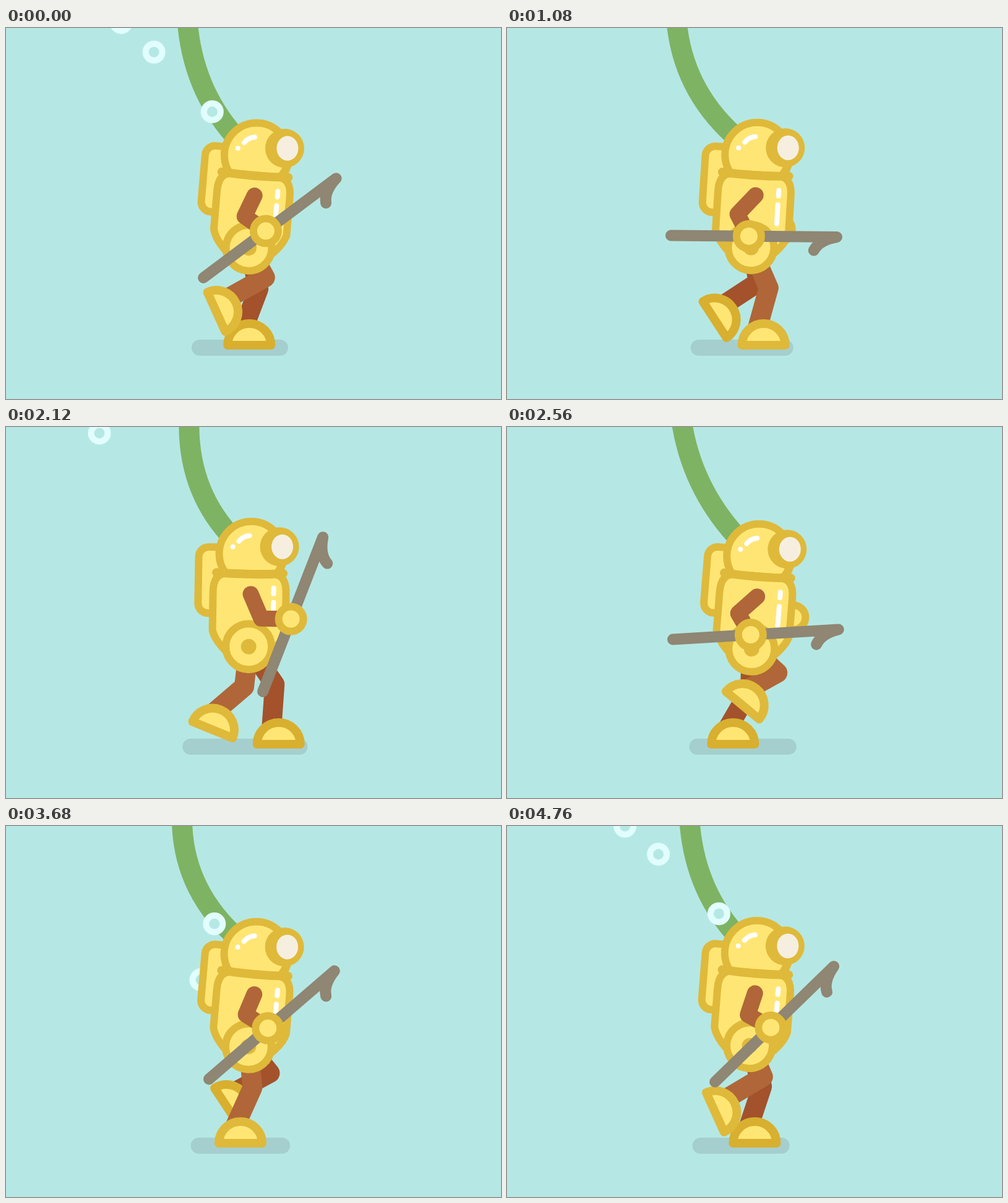
These frames come from a looping animation (800x600 px, 4.8 s). An HTML page with a canvas:

```html
<!DOCTYPE html>
<html lang="en">
<head>
<meta charset="utf-8">
<title>Walking diver</title>
<style>
html, body { margin: 0; width: 100%; height: 100%; overflow: hidden; background: #b5e8e4; }
canvas { display: block; }
</style>
</head>
<body>
<canvas id="stage" width="800" height="600"></canvas>
<script>
const ctx = document.getElementById('stage').getContext('2d');
const LOOP = 4800, STRIDE = 2400;
const LIFT_OFF = 1770, SWING = 1220, REAR = 326, REACH = 142, GROUND = 513;
const WATER = '#b5e8e4', GOLD = '#dfb93a', FAR_GOLD = '#d8af2f', YELLOW = '#ffe674';
const SKIN = '#b06638', FAR_SKIN = '#a3522c', STEEL = '#8f8673', WHITE = '#ffffff';

// birth time, start x, y, speed x, y in px per second
const BUBBLES = [
  [1400, 355, 175, -283, -229],
  [3600, 355, 175, -225, -207],
  [3680, 315, 249, -115, -230],
  [3850, 355, 175, -274, -223],
  [3960, 356, 177, -139, -164],
  [4680, 361, 155, -229, -162]
];

const { sin, cos, PI } = Math;
const radians = degrees => degrees * PI / 180;
const angleAt = time => time / STRIDE * 2 * PI;

function smoothstep(from, to, value) {
  const u = Math.max(0, Math.min(1, (value - from) / (to - from)));
  return u * u * (3 - 2 * u);
}

function turn(x, y, degrees) {
  const c = cos(radians(degrees)), s = sin(radians(degrees));
  return [x * c - y * s, x * s + y * c];
}

// The foot slides back along the ground, then lifts, tips and swings forward.
function footPose(time) {
  const age = (time - LIFT_OFF + 2 * STRIDE) % STRIDE;
  if (age > SWING) {
    return { x: REAR + REACH * (1 - smoothstep(SWING, STRIDE, age)), y: GROUND, tilt: 0 };
  }
  const v = age / SWING, arch = sin(PI * v);
  return {
    x: REAR + REACH * smoothstep(.47, .94, v) + 10 * arch,
    y: GROUND - 63 * sin(PI * v ** 1.7),
    tilt: 66 * Math.max(0, arch) ** 4.5
  };
}

function kneeOffset(time) {
  const p = angleAt(time);
  return [
    17 + 43 * sin(p + .12) + 4 * cos(2 * p),
    57 - 16 * cos(p - .96) - 6 * sin(2 * p)
  ];
}

function bodyPose(p) {
  return {
    x: 395.5 + 4.5 * sin(p) - 3 * cos(2 * p),
    y: 358.5 + sin(p) + 3.7 * cos(2 * p - 2.44),
    tilt: 1.7 + 3.3 * cos(2 * p - .35),
    hoseTop: 279 + 18 * cos(p + 1.22) + 9 * cos(2 * p),
    hoseBend: 290 + 8 * cos(p) + 8 * cos(2 * p)
  };
}

// One arm swing drives hand, elbow and spear.
function armPose(p) {
  const s = sin(p - .08), bulge = s * s;
  return {
    hand: [415 - 63 * s, 330 + 20.8 * s - 8.4 * bulge],
    elbow: [383 - 32 * s + 12 * bulge, 304 - 8 * s],
    spear: -31 + 62 * sin(1.25 * s) + 21 * bulge,
    farHand: [425 + 75 * sin(p + .1), 324 - 22 * sin(p + .4)]
  };
}

function shape(path, stroke, width, fill) {
  const p = typeof path === 'string' ? new Path2D(path) : path;
  if (fill) { ctx.fillStyle = fill; ctx.fill(p); }
  if (stroke) { ctx.strokeStyle = stroke; ctx.lineWidth = width; ctx.stroke(p); }
}

function ellipse(x, y, rx, ry, stroke, width, fill) {
  const p = new Path2D();
  p.ellipse(x, y, rx, ry, 0, 0, 2 * PI);
  shape(p, stroke, width, fill);
}

const circle = (x, y, r, stroke, width, fill) => ellipse(x, y, r, r, stroke, width, fill);
const drawHand = ([x, y]) => circle(x, y, 20, GOLD, 12, YELLOW);

function line(points, color, width) {
  const p = new Path2D();
  points.forEach(([x, y]) => p.lineTo(x, y));
  shape(p, color, width);
}

function at(x, y, degrees, draw) {
  ctx.save();
  ctx.translate(x, y);
  ctx.rotate(radians(degrees));
  draw();
  ctx.restore();
}

function drawShadow(p) {
  const spread = 26 * (1 - cos(2 * p));
  const x = 378 + spread * .36, half = 65 + spread;
  line([[x - half, 517], [x + half, 517]], '#a5cfce', 26);
}

function drawLeg(time, hip, skin, gold) {
  const { x, y, tilt } = footPose(time);
  const [kneeX, kneeY] = kneeOffset(time), [ankleX, ankleY] = turn(-12, -20, tilt);
  line([[hip.x, hip.y], [hip.x + kneeX, hip.y + kneeY], [x + ankleX, y + ankleY]], skin, 32);
  at(x, y, tilt, () => shape('M-35 0A35 35 0 0 1 35 0Z', gold, 14, YELLOW));
}

function drawHose(topX, bendX, endX, endY) {
  const bendY = 200 - endY / 2;
  shape(`M${topX - (bendX - topX) * .2} ${-bendY * .2}L${topX} 0Q${bendX} ${bendY} ${endX} ${endY}`, '#7eb363', 33);
}

function drawBubbles(time) {
  for (const [birth, x, y, vx, vy] of BUBBLES) {
    const age = (time - birth + LOOP) % LOOP / 1000;
    circle(x + vx * age, y + vy * age, 13.5, '#e1fdfd', 10, WATER);
  }
}

function drawPack() {
  const pack = new Path2D();
  pack.roundRect(-83, -160, 60, 107, 16);
  shape(pack, GOLD, 12, YELLOW);
}

function drawHelmet() {
  circle(0, 0, 52, GOLD, 12, YELLOW);
  line([[50, 18], [45, 30]], GOLD, 12);
  circle(45.5, -11, 31.5, null, 0, GOLD);
  ellipse(50, -11, 17.5, 20, null, 0, '#f6efe0');
  shape('M-20 -20Q-14 -28 -3 -29M-30 -11h.01', WHITE, 8);
}

function drawTorso() {
  shape('M-59 -88Q-59 -118 -36 -118H36Q59 -118 59 -88V-26Q55 -8 30 14H-30Q-55 -8 -59 -26Z', GOLD, 12, YELLOW);
  shape('M-54 -119Q0 -115 54 -119', GOLD, 14);
  shape('M39 -95V-86M39 -72V-41', WHITE, 8);
  circle(0, 0, 37, GOLD, 12, YELLOW);
  circle(0, 0, 12.5, null, 0, GOLD);
}

function drawSpear() {
  shape('M-126 0H142Q114 5 105 22', STEEL, 18);
}

function draw(time) {
  ctx.fillStyle = WATER;
  ctx.fillRect(0, 0, 800, 600);
  ctx.lineCap = ctx.lineJoin = 'round';

  const p = angleAt(time), body = bodyPose(p), arm = armPose(p);
  const local = (px, py) => {
    const [dx, dy] = turn(px, py, body.tilt);
    return [body.x + dx, body.y + dy];
  };
  const [neckX, neckY] = local(0, -118);
  const headX = neckX + 2.5, headY = neckY - 32.5;

  drawShadow(p);
  line([local(35, -62), arm.farHand], FAR_SKIN, 26);
  drawHand(arm.farHand);
  drawLeg(time + STRIDE / 2, body, FAR_SKIN, FAR_GOLD);
  drawLeg(time, body, SKIN, GOLD);

  drawHose(body.hoseTop, body.hoseBend, headX - 27, headY - 22);
  drawBubbles(time);
  at(body.x, body.y, body.tilt, drawPack);
  at(headX, headY, 0, drawHelmet);
  at(body.x, body.y, body.tilt, drawTorso);

  line([local(2, -85), arm.elbow, arm.hand], SKIN, 26);
  at(...arm.hand, arm.spear, drawSpear);
  drawHand(arm.hand);
}

function tick() {
  draw(performance.now() % LOOP);
  requestAnimationFrame(tick);
}
tick();
</script>
</body>
</html>
```
